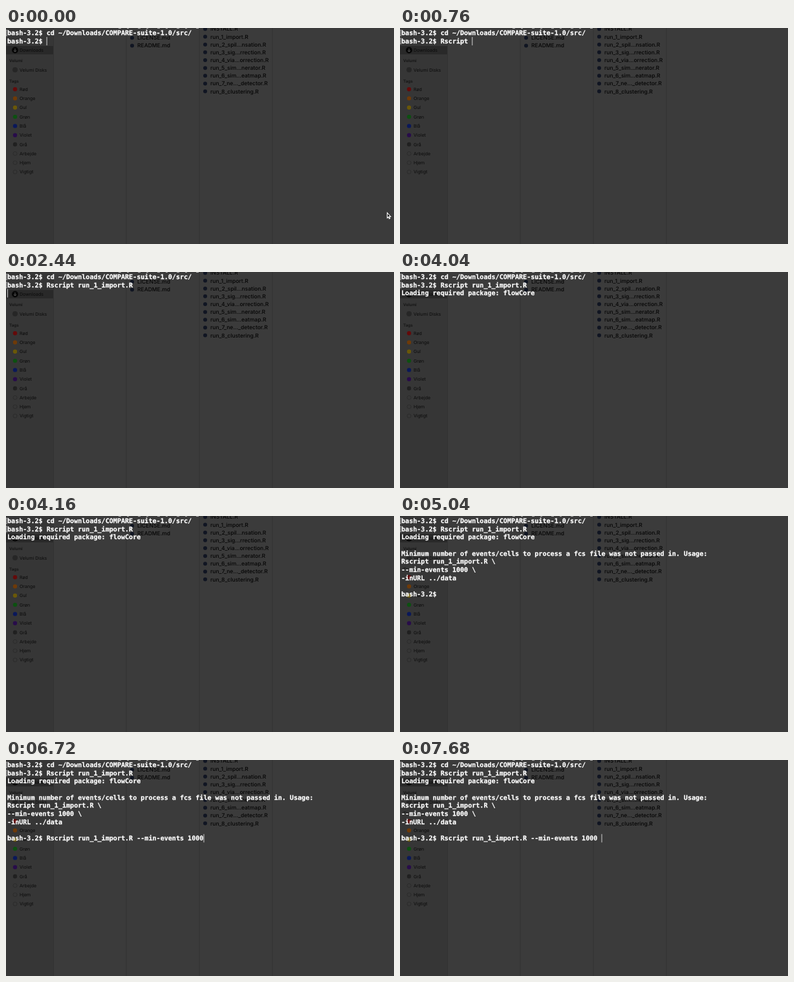
Write an HTML page that moves like this. It is 600 px wide and 336 px high and loops after 8000 ms.

```html
<!DOCTYPE html>
<html lang="en">
<head>
<meta charset="utf-8">
<title>Terminal session</title>
<style>
  html, body { margin: 0; height: 100%; overflow: hidden; background: #3b3b3b; }
  svg { display: block; width: 600px; height: 336px; text-rendering: geometricPrecision; }
  #finder { font: 7px Inter, "Open Sans", sans-serif; fill: #0b0b0b; }
  #finder .file { font-size: 8.5px; font-weight: 500; fill: #050505; }
  #finder .head { font-size: 6.3px; font-weight: 600; fill: #141414; }
  #term { font: bold 10.08px "DejaVu Sans Mono", "Noto Sans Mono", monospace; fill: #fff; stroke: #fff; stroke-width: .25; }
  #term text { white-space: pre; }
</style>
</head>
<body>
<svg viewBox="0 0 600 336">
  <path fill="#363636" d="M0 0h73v336H0z"/>
  <path fill="#292929" d="M0 28h73v13H0z"/>
  <path stroke="#323232" d="M73.5 0V336M186 0V336M299 0V336M412 0V336"/>
  <g id="finder">
    <circle cx="14" cy="34.5" r="5" fill="#080808"/>
    <path d="M14 32v5M12 35l2 2l2-2" fill="none" stroke="#555"/>
    <circle cx="14" cy="65" r="4" fill="#262626"/>
  </g>
  <!-- descenders of the line scrolled off the top -->
  <path stroke="#ddd" stroke-width=".8" stroke-dasharray="4 9 3 14" d="M174 .4H306"/>
  <g id="term"></g>
  <path id="brackets" fill="none" stroke="#ccc" stroke-width=".8"/>
  <rect id="caret" width="1.3" height="13" fill="#b0b0b0"/>
  <path id="mouse" fill="#111" stroke="#fff" stroke-width="1.1" d="M589.5 287.5v8l1.8-1.6l1.3 2.8l1.2-.6l-1.2-2.6h2.2z"/>
</svg>
<script>
const $ = id => document.getElementById(id);
const finder = $('finder'), term = $('term');

function add(parent, tag, attrs, text = '') {
  const el = document.createElementNS('http://www.w3.org/2000/svg', tag);
  for (const key in attrs) el.setAttribute(key, attrs[key]);
  el.textContent = text;
  parent.append(el);
  return el;
}
const label = (x, y, text, cls = '') => add(finder, 'text', { x, y, class: cls }, text);

// Finder window behind the terminal
label(21, 37, 'Downloads');
label(5, 53.4, 'Velumi', 'head');
label(21, 67.5, 'Velumi Disks');
label(5, 85.4, 'Tags', 'head');

const tags = [
  ['Rød', '#640a0a'], ['Orange', '#6e3a08'], ['Gul', '#6a5808'], ['Grøn', '#0c5010'],
  ['Blå', '#0a185a'], ['Violet', '#280c4a'], ['Grå', '#202020'],
  ['Arbejde'], ['Hjem'], ['Vigtigt']
];
tags.forEach(([name, color], i) => {
  const cy = 95.2 + i * 14.3;
  add(finder, 'circle', color
    ? { cx: 14, cy, r: 3.2, fill: color }
    : { cx: 14, cy, r: 3, fill: 'none', stroke: '#262626', 'stroke-width': .6 });
  label(21, cy + 2.5, name);
});

function files(x, y, names) {
  names.forEach((name, i) => {
    const cy = y + i * 12.15;
    add(finder, 'circle', { cx: x, cy, r: 3, fill: '#101522' });
    label(x + 8, cy + 3, name, 'file');
  });
}
files(195, 15.3, ['LICENSE.md', 'README.md']);
files(308, 1.4, [
  'INSTALL.R', 'run_1_import.R', 'run_2_spil...nsation.R', 'run_3_sig...rrection.R',
  'run_4_via...orrection.R', 'run_5_sim...nerator.R', 'run_6_sim...eatmap.R',
  'run_7_ne..._detector.R', 'run_8_clustering.R'
]);

// Terminal: [time, appended text, caret hidden]
const prompt = 'bash-3.2$ ';
const usage = `
Minimum number of events/cells to process a fcs file was not passed in. Usage:
Rscript run_1_import.R \\
--min-events 1000 \\
-inURL ../data

`;
const events = [
  [0, prompt + 'cd ~/Downloads/COMPARE-suite-1.0/src/\n' + prompt],
  [80, 'R'], [400, 's'], [560, 'c'], [760, 'ript '], [800, 'r'],
  [1000, 'u'], [1160, 'n'], [1320, '_'], [2120, '1'],
  [2320, '_import.R'], [2440, '\n'],
  [2800, 'Loading required package: flowCore\n'], [4040, '', true],
  [4240, usage + prompt], [5040, '', true],
  [5280, 'Rscript run_1_import.R'], [6120, ' '],
  [6680, '--min-events 1000'], [7400, ' ']
];
const left = 2, charW = 6.07, lineH = 12.65;
const rows = Array.from({ length: 10 }, (_, i) =>
  add(term, 'text', { x: left, y: 11.1 + i * lineH }));

function draw(t) {
  const past = events.filter(e => e[0] <= t);
  const lines = past.map(e => e[1]).join('').split('\n');
  rows.forEach((row, i) => row.textContent = lines[i] || '');
  const last = lines.length - 1;
  $('caret').setAttribute('x', left + lines[last].length * charW - .2);
  $('caret').setAttribute('y', 1.4 + last * lineH);
  $('caret').style.display = past.at(-1)[2] ? 'none' : '';
  $('brackets').setAttribute('d', 'M2 3.2H.6v9H2' + (t < 760 ? '' : 'M2 15.8H.6v9H2'));
  $('mouse').style.display = t < 80 ? '' : 'none';
}

const start = performance.now();
function tick() {
  draw((performance.now() - start) % 8000);
  requestAnimationFrame(tick);
}
tick();
</script>
</body>
</html>
```
